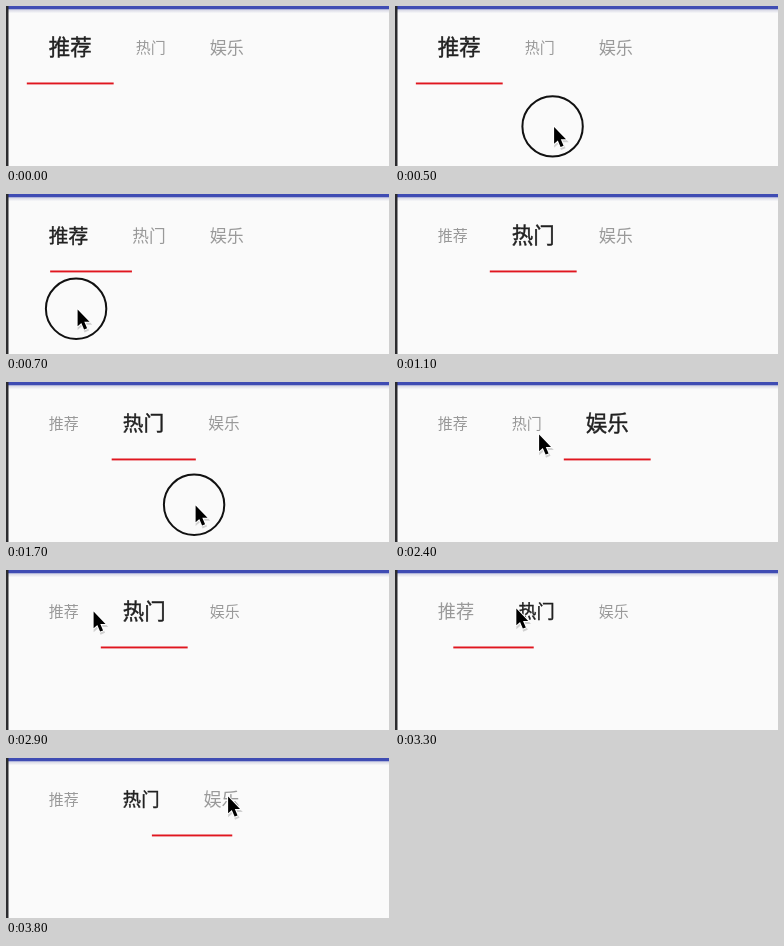
An HTML page for the animation above (3900 ms loop, 383 by 160 pixels).

```html
<!DOCTYPE html>
<html lang="zh">
<head>
<meta charset="utf-8">
<title>Tabs</title>
<style>
html, body { margin: 0; width: 100%; height: 100%; overflow: hidden; background: #fafafa; }
svg { display: block; width: 383px; height: 160px; }
text { font-family: "Noto Sans CJK SC", "Noto Sans CJK", "Noto Sans", sans-serif; fill: #999; }
text.on { fill: #212121; stroke: #212121; stroke-width: .02em; }
</style>
</head>
<body>
<svg viewBox="0 0 383 160">
  <defs>
    <linearGradient id="shade" x1="0" y1="0" x2="0" y2="1">
      <stop offset="0" stop-color="#d2d3e2"/>
      <stop offset="1" stop-color="#fafafa"/>
    </linearGradient>
  </defs>
  <rect width="383" height="160" fill="#fafafa"/>
  <rect y="3.3" width="383" height="4" fill="url(#shade)"/>
  <rect width="383" height="3.3" fill="#3f4cb3"/>
  <rect width="2.5" height="160" fill="#2b2b2e"/>
  <text>推荐</text>
  <text>热门</text>
  <text>娱乐</text>
  <rect id="line" y="76.5" height="1.9" fill="#e0161f"/>
  <circle id="press" r="30.2" fill="none" stroke="#111" stroke-width="2"/>
  <g id="cursor">
    <path d="M1 2V20L5 16.5L8 23.5L11 22.2L8 15.5H13.5Z" opacity=".16" stroke="#000" stroke-width="2"/>
    <path d="M0 0V18L4 14.5L7 21.5L10.2 20.2L7.2 13.2H12.8Z" stroke="#fff" stroke-width="2.2" paint-order="stroke" stroke-linejoin="round"/>
  </g>
</svg>
<script>
const LOOP = 3900, STEP = 100;
const SMALL = 15, BIG = 21.43, FRESH = 17.14, PAD = 22, LEFT = 20.8;
const LEAD = 9; // the line runs slightly ahead of the labels

// page changes: start, duration, target page
const moves = [[500, 600, 1], [1575, 600, 2], [2450, 450, 1], [3100, 400, 0], [3700, 150, 2]];

// pointer: time, x, y
const drag = [[300, 246, 126], [700, 71, 114.8]];
const roam = [[1200, 264, 121], [1400, 264, 121], [1700, 189, 122.8], [2000, 92, 98],
  [2400, 143.5, 52], [2900, 87, 41], [3100, 66, 38], [3600, 221.5, 38]];
const presses = [[300, 800], [1300, 1900], [2500, 2600], [3100, 3200]];

const $ = id => document.getElementById(id);
const labels = [...document.querySelectorAll("text")];
const line = $("line"), press = $("press"), cursor = $("cursor");

const mix = (a, b, f) => a + (b - a) * f;
const ease = u => {
  u = Math.min(1, Math.max(0, u));
  return u * u * (3 - 2 * u);
};

function set(el, attrs) {
  for (const k in attrs) el.setAttribute(k, attrs[k]);
}

function pageAt(t) {
  return moves.reduce((page, [start, time, to]) => mix(page, to, ease((t - start) / time)), 0);
}

function pointAt(path, t) {
  let [, x, y] = path[0];
  for (let i = 1; i < path.length; i++) {
    const f = ease((t - path[i - 1][0]) / (path[i][0] - path[i - 1][0]));
    x = mix(x, path[i][1], f);
    y = mix(y, path[i][2], f);
  }
  return [x, y];
}

function drawTabs(t) {
  const page = pageAt(t), tabs = [];
  let x = LEFT;
  labels.forEach((el, i) => {
    const near = Math.max(0, 1 - Math.abs(page - i));
    // the last tab keeps its initial size until first scrolled to
    const size = i === 2 && t < 1500 ? FRESH : mix(SMALL, BIG, near);
    const width = 2 * (PAD + size);
    set(el, { x: x + PAD, y: 41.2 + size * .38, "font-size": size, class: Math.round(page) === i ? "on" : "" });
    tabs.push({ x, width });
    x += width;
  });
  const pos = pageAt(t + LEAD), i = Math.floor(pos), f = pos - i;
  const a = tabs[i], b = tabs[i + 1] || a;
  set(line, { x: mix(a.x, b.x, f), width: mix(a.width, b.width, f) });
}

function drawPointer(t) {
  const path = t < 800 ? drag : roam;
  const shown = t >= path[0][0];
  const down = presses.some(([a, b]) => t >= a && t < b);
  const [x, y] = pointAt(path, t);
  set(cursor, { transform: `translate(${x + .6} ${y + .6}) scale(.93)`, visibility: shown ? "visible" : "hidden" });
  set(press, { cx: x - .9, cy: y, visibility: shown && down ? "visible" : "hidden" });
}

function draw(now) {
  const t = Math.floor((now % LOOP) / STEP) * STEP;
  drawTabs(t);
  drawPointer(t);
}

const start = performance.now();
function tick() {
  draw(Math.max(0, performance.now() - start));
  requestAnimationFrame(tick);
}
tick();
</script>
</body>
</html>
```
